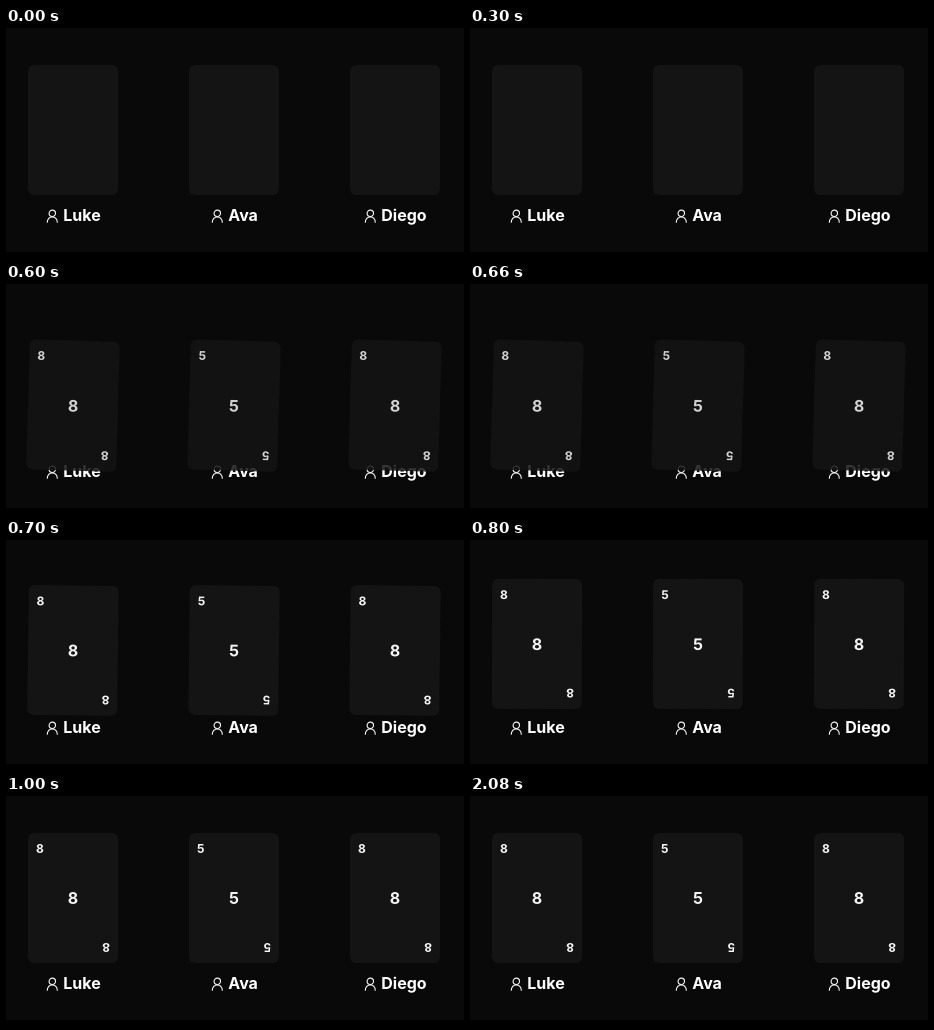
An HTML page for the animation above (2.8 s loop, 458x228 px).

```html
<!DOCTYPE html>
<html lang="en">
<head>
<meta charset="utf-8">
<title>Dealt cards</title>
<style>
  html, body { margin: 0; height: 100%; overflow: hidden; background: #090909; }
  svg { display: block; width: 458px; height: 228px; }
  text { font: 700 16px Inter, sans-serif; fill: #fff; }
  .card text { fill: #f4f4f4; text-anchor: middle; }
  .card .corner { font-size: 12px; }
  .icon { fill: none; stroke: #f4f4f4; stroke-width: 1.15; stroke-linecap: round; }
</style>
</head>
<body>
<svg id="stage" viewBox="0 0 458 228"></svg>
<script>
const LOOP = 2800, DEAL = 500, STEP = 100, SETTLE = 400;
const stage = document.getElementById('stage');

const players = [
  { name: 'Luke', card: 8, x: 67, icon: 46.3 },
  { name: 'Ava', card: 5, x: 228, icon: 211.3 },
  { name: 'Diego', card: 8, x: 389, icon: 364.3 }
];

const label = p => `
  <g class="icon" transform="translate(${p.icon} 188)">
    <circle cy="-2.7" r="3.2"/>
    <path d="M-5 6.2a5 5.4 0 0 1 10 0"/>
  </g>
  <text x="${p.icon + 11}" y="193">${p.name}</text>`;

const corner = n => `<text class="corner" x="-33.2" y="-44.8">${n}</text>`;

const card = p => `
  <g class="card">
    <rect x="-45" y="-65" width="90" height="130" rx="6" fill="#141414"/>
    <g class="face">
      <text y="6">${p.card}</text>
      ${corner(p.card)}
      <g transform="rotate(180)">${corner(p.card)}</g>
    </g>
  </g>`;

stage.innerHTML = '<rect y="224" width="458" height="4" fill="#000"/>'
  + players.map(label).join('') + players.map(card).join('');

const cards = [...stage.querySelectorAll('.card')];
const faces = [...stage.querySelectorAll('.face')];

function draw(time) {
  // The motion advances in 100 ms steps.
  const t = Math.floor(time % LOOP / STEP) * STEP - DEAL;
  const dealt = t >= 0;
  const left = dealt ? Math.max(0, 1 - t / SETTLE) ** 2.1 : 0;
  const opacity = dealt ? Math.min(1, 0.27 + 0.0059 * t) : 1;
  cards.forEach((el, i) => {
    el.setAttribute('transform',
      `translate(${players[i].x} ${102 + 36 * left}) rotate(${3 * left})`);
    el.setAttribute('opacity', opacity);
    faces[i].setAttribute('visibility', dealt ? 'visible' : 'hidden');
  });
}

const start = performance.now();
function tick() {
  draw(performance.now() - start);
  requestAnimationFrame(tick);
}
tick();
</script>
</body>
</html>
```
